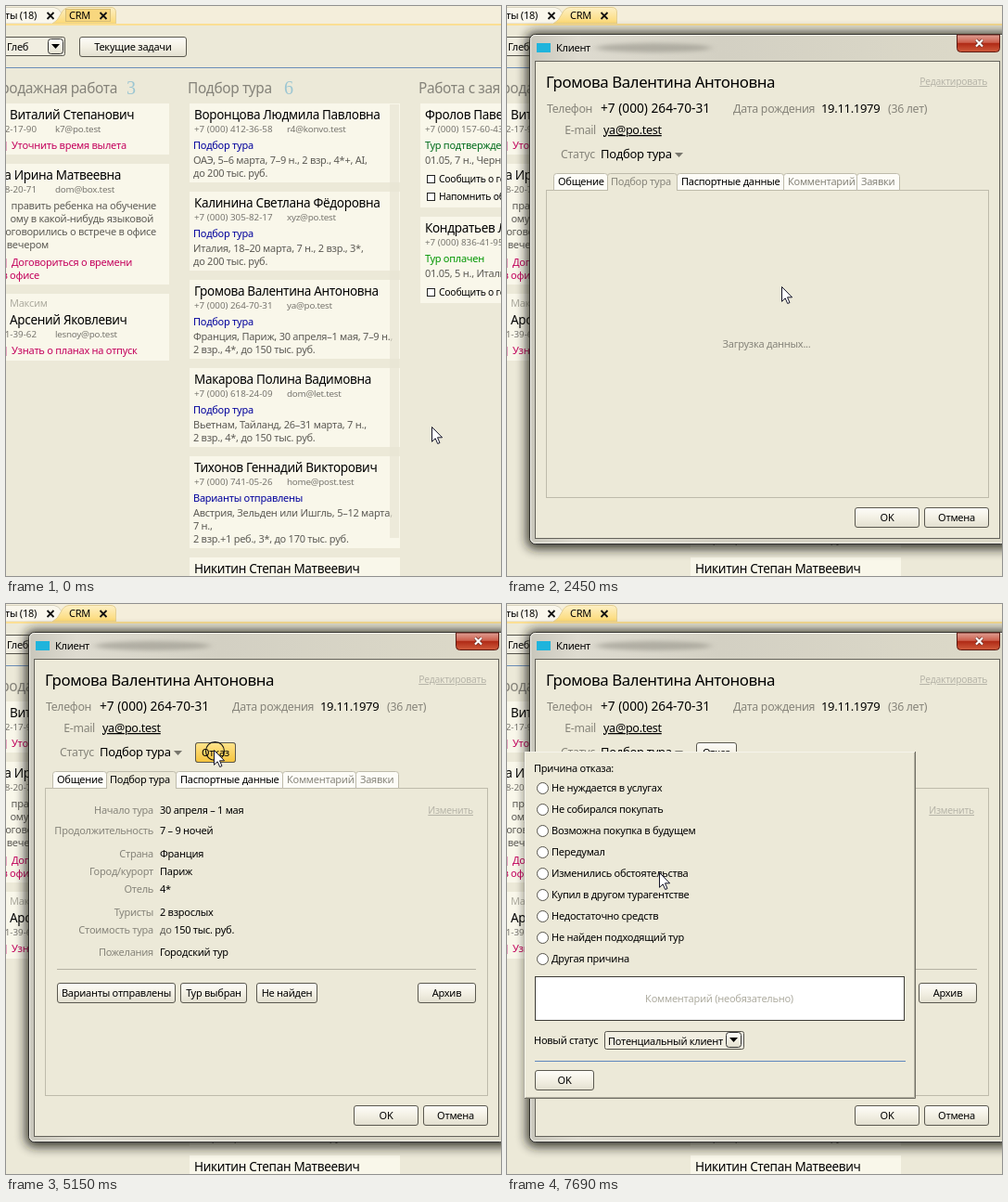
Animation, 534 px wide and 614 px high, one loop 8 s. Source, as an HTML page:

```html
<!DOCTYPE html>
<html lang="ru">
<head>
<meta charset="utf-8">
<title>CRM</title>
<style>
html, body { margin: 0; width: 100%; height: 100%; overflow: hidden; background: #ece9d8; }
svg { display: block; width: 534px; height: 614px; }
text { font: 11px "Noto Sans", "Open Sans", sans-serif; letter-spacing: -.024em; fill: #000; white-space: pre; }
.name { font-size: 13.5px; }
.head { font-size: 15.4px; fill: #85837a; }
.count { font: 20px "Liberation Serif", serif; fill: #9cc6d2; }
.small { font-size: 9.8px; fill: #78766f; }
.phone { letter-spacing: 0; }
.body { fill: #5d5b55; }
.blue { fill: #00009c; }
.pink { fill: #c4005c; }
.green { fill: #006c1c; }
.paid { fill: #009600; }
.task { font-size: 10.4px; }
.mute { fill: #86847a; }
.pale { fill: #aeaca0; }
.link { font-size: 10.3px; fill: #b6b4a8; text-decoration: underline; }
.title { font-size: 16.8px; }
.label { font-size: 12.3px; fill: #86847a; }
.value { font-size: 13px; }
.tel { font-size: 13.7px; letter-spacing: 0; }
.mail { font-size: 12.6px; text-decoration: underline; }

.timed, #cursor, #cursor g { animation: 8s step-end infinite; }
#win { animation-name: win; }
#focus { animation-name: focus; }
#load { animation-name: load; }
#data { animation-name: data; }
#hot { animation-name: hot; }
#popup { animation-name: popup; }
#caret { animation-name: caret; }
#click1 { animation-name: click1; }
#click2 { animation-name: click2; }
#cursor { animation-name: move; }
#cursor #arrow { animation-name: arrow; }
#cursor #hand { animation-name: hand; }

@keyframes win { 0% { visibility: hidden } 30.625%, 100% { visibility: visible } }
@keyframes focus { 0% { visibility: visible } 30.625%, 100% { visibility: hidden } }
@keyframes load { 0%, 32.375%, 100% { visibility: hidden } 30.625% { visibility: visible } }
@keyframes data { 0% { visibility: hidden } 32.375%, 100% { visibility: visible } }
@keyframes hot { 0%, 78.875%, 100% { visibility: hidden } 55.5% { visibility: visible } }
@keyframes popup { 0% { visibility: hidden } 66.125%, 100% { visibility: visible } }
@keyframes caret {
  0%, 80.625%, 94.25%, 100% { visibility: hidden }
  73.25%, 87.375% { visibility: visible }
}
@keyframes click1 { 0%, 30.625%, 100% { visibility: hidden } 28.625% { visibility: visible } }
@keyframes click2 { 0%, 66.125%, 100% { visibility: hidden } 64.375% { visibility: visible } }
@keyframes arrow { 0%, 30.625%, 100% { visibility: visible } 18.1% { visibility: hidden } }
@keyframes hand { 0%, 30.625%, 100% { visibility: hidden } 18.1% { visibility: visible } }
@keyframes move {
  0% { transform: translate(459px, 453px) }
  6.25% { transform: translate(459px, 453px); animation-timing-function: steps(8, start) }
  19.8% { transform: translate(319px, 312px) }
  19.875% { transform: translate(319px, 312px); animation-timing-function: steps(4, start) }
  26.5% { transform: translate(296px, 302px) }
  43% { transform: translate(286px, 288px) }
  44.75% { transform: translate(286px, 288px); animation-timing-function: steps(7, start) }
  57.25% { transform: translate(225px, 157px) }
  57.375% { transform: translate(224px, 157px) }
  78.875% { transform: translate(224px, 157px); animation-timing-function: steps(5, start) }
  87.3% { transform: translate(210px, 194px) }
  87.375% { transform: translate(210px, 194px); animation-timing-function: steps(3, start) }
  92.3% { transform: translate(172px, 262px) }
  92.5% { transform: translate(172px, 262px); animation-timing-function: steps(3, start) }
  97.9%, 100% { transform: translate(164px, 289px) }
}
</style>
</head>
<body>
<svg viewBox="0 0 534 614">
  <defs>
    <linearGradient id="face" x2="0" y2="1">
      <stop stop-color="#fefdf9"/><stop offset=".5" stop-color="#f3f0e4"/><stop offset="1" stop-color="#e2dfcf"/>
    </linearGradient>
    <linearGradient id="gold" x2="0" y2="1">
      <stop stop-color="#ffe48c"/><stop offset="1" stop-color="#f5c33c"/>
    </linearGradient>
    <linearGradient id="tab" x2="0" y2="1">
      <stop stop-color="#fdf0c6"/><stop offset="1" stop-color="#fcd974"/>
    </linearGradient>
    <linearGradient id="red" x2="0" y2="1">
      <stop stop-color="#e0a095"/><stop offset=".45" stop-color="#cc5f4c"/>
      <stop offset=".5" stop-color="#b02a16"/><stop offset="1" stop-color="#cf5b3c"/>
    </linearGradient>
    <linearGradient id="glass">
      <stop stop-color="#c9c7bc"/><stop offset=".1" stop-color="#dedbd0"/>
      <stop offset=".4" stop-color="#d3d0c3"/><stop offset="1" stop-color="#dddac9"/>
    </linearGradient>
    <filter id="blur" x="-10%" y="-10%" width="120%" height="120%"><feGaussianBlur stdDeviation="6"/></filter>
    <filter id="haze" x="-20%" y="-100%" width="140%" height="300%"><feGaussianBlur stdDeviation="4 2"/></filter>
  </defs>
  <g id="page"></g>
  <g id="win" class="timed"></g>
  <g id="popup" class="timed"></g>
  <g fill="none" stroke="#111" stroke-width="1.1">
    <circle id="click1" class="timed" cx="297" cy="303.5" r="10"/>
    <circle id="click2" class="timed" cx="225.5" cy="158.5" r="10"/>
  </g>
  <g id="cursor" fill="#fff" stroke="#15152a" stroke-linejoin="round">
    <g id="arrow"><path d="M.5.5V16.3L4.2 12.8 6.7 18.5 9 17.5 6.5 11.8H11.6Z"/></g>
    <g id="hand"><path d="M-1.5 13V2a1.8 1.8 0 0 1 3.6 0v5.5q1.7-1.3 3 .4q1.8-.9 2.9.7q2.5-.4 2.8 1.8v4.6l-2 4v2.7h-8.5v-2.7l-5-6.6q-.8-1.6.6-2q1.2-.2 2.6 2.6z"/></g>
  </g>
</svg>
<script>
const text = (x, y, s, cls = '', anchor = 'start') =>
  `<text x="${x}" y="${y}" class="${cls}" text-anchor="${anchor}">${s}</text>`;
const fill = (x, y, w, h, color) =>
  `<rect x="${x}" y="${y}" width="${w}" height="${h}" fill="${color}"/>`;
const box = (x, y, w, h, color, line, r = 0) =>
  `<rect x="${x + .5}" y="${y + .5}" width="${w - 1}" height="${h - 1}" rx="${r}" fill="${color}" stroke="${line}"/>`;
const path = (d, color, line = 'none', w = 1) =>
  `<path d="${d}" fill="${color}" stroke="${line}" stroke-width="${w}"/>`;
const button = (x, y, w, h, s, face = 'url(#face)') =>
  box(x, y, w, h, face, '#5a584f', 2.5) + text(x + w / 2, y + h / 2 + 4, s, '', 'middle');
const cross = (x, y, color = '#111', w = 1.8) =>
  path(`M${x - 3.5} ${y - 3.5}l7 7m0-7l-7 7`, 'none', color, w);
const drop = (x, y) =>
  box(x, y, 17, 17, 'url(#face)', '#333', 3) + path(`M${x + 4} ${y + 6}h9l-4.5 5z`, '#000');
const card = (x, y, w, h) => fill(x, y, w, h, '#f9f7ea');
const put = (id, parts) => document.getElementById(id).innerHTML = parts.join('');

function tourCard(y, h, name, phone, mail, status, lines) {
  return card(198, y, 227, h) + text(203, y + 17, name, 'name') +
    text(203, y + 31, phone, 'small phone') + text(303, y + 31, mail, 'small') +
    text(202, y + 49, status, 'blue') +
    lines.map((s, i) => text(202, y + 65 + 14 * i, s, 'body')).join('');
}

function orderCard(y, h, name, phone, status, cls, about, tasks) {
  return card(447, y, 90, h) + text(452, y + 17, name, 'name') +
    text(452, y + 31, phone, 'small phone') + text(452, y + 49, status, cls) +
    text(452, y + 65, about, 'body') +
    tasks.map((s, i) => box(454, y + 77 + 19 * i, 9, 9, '#fff', '#222') +
      text(467, y + 85 + 19 * i, s, 'task')).join('');
}

const choose = 'Подбор тура';
put('page', [
  fill(0, 0, 534, 614, '#ece9d8'),
  fill(0, 0, 534, 19, '#f4eedb'),
  path('M-1 1.5H52Q57 2 60 8T66 19H-1z', '#faf7ec', '#d8d3bf'),
  path('M50 19Q56 16 59 9T68 1.5H113Q118.5 1.5 118.5 7V19z', 'url(#tab)', '#e3cf93'),
  '<g id="focus" class="timed">', box(64, 3, 49, 14, '#f8d77e', '#d6bd78'), '</g>',
  fill(0, 19, 534, 2, '#fbdf94'),
  text(33, 14, 'Контакты (18)', '', 'end'), cross(48, 10.5),
  text(68, 14, 'CRM'), cross(105, 10.5),
  box(-5, 33, 69, 21, '#f1eee1', '#55534b', 2), text(1, 48, 'Глеб'), drop(45, 35),
  button(79, 33, 116, 22, 'Текущие задачи'),
  fill(0, 66, 534, 1, '#6a8db8'),

  text(120, 94, 'Предпродажная работа', 'head', 'end'), text(130, 95, '3', 'count'),
  text(196, 94, choose, 'head'), text(300, 95, '6', 'count'),
  text(445, 94, 'Работа с заявками', 'head'),

  card(0, 105, 176, 55),
  text(4, 122, 'Виталий Степанович', 'name'),
  text(33, 136, '42-17-90', 'small phone', 'end'), text(53, 136, 'k7@po.test', 'small'),
  fill(0, 146, 1, 10, '#e6a6c0'), text(6, 154, 'Уточнить время вылета', 'pink'),

  card(0, 170, 176, 130),
  text(124, 187, 'Голубева Ирина Матвеевна', 'name', 'end'),
  text(33, 201, '38-20-71', 'small phone', 'end'), text(53, 201, 'dom@box.test', 'small'),
  text(162, 219, 'править ребенка на обучение', 'body', 'end'),
  text(159, 233, 'ому в какой-нибудь языковой', 'body', 'end'),
  text(162, 247, 'Договорились о встрече в офисе', 'body', 'end'),
  text(46, 261, 'у вечером', 'body', 'end'),
  fill(0, 272, 1, 10, '#e6a6c0'), text(6, 280, 'Договориться о времени', 'pink'),
  text(36, 294, 'в офисе', 'pink', 'end'),

  card(0, 310, 176, 72),
  text(4, 324, 'Максим', 'pale'), text(4, 343, 'Арсений Яковлевич', 'name'),
  text(33, 357, '51-39-62', 'small phone', 'end'), text(53, 357, 'lesnoy@po.test', 'small'),
  fill(0, 367, 1, 10, '#e6a6c0'), text(6, 375, 'Узнать о планах на отпуск', 'pink'),

  tourCard(105, 85, 'Воронцова Людмила Павловна', '+7 (000) 412-36-58', 'r4@konvo.test', choose,
    ['ОАЭ, 5–6 марта, 7–9 н., 2 взр., 4*+, AI,', 'до 200 тыс. руб.']),
  tourCard(200, 85, 'Калинина Светлана Фёдоровна', '+7 (000) 305-82-17', 'xyz@po.test', choose,
    ['Италия, 18–20 марта, 7 н., 2 взр., 3*,', 'до 200 тыс. руб.']),
  tourCard(295, 85, 'Громова Валентина Антоновна', '+7 (000) 264-70-31', 'ya@po.test', choose,
    ['Франция, Париж, 30 апреля–1 мая, 7–9 н.,', '2 взр., 4*, до 150 тыс. руб.']),
  tourCard(390, 85, 'Макарова Полина Вадимовна', '+7 (000) 618-24-09', 'dom@let.test', choose,
    ['Вьетнам, Тайланд, 26–31 марта, 7 н.,', '2 взр., 4*, до 150 тыс. руб.']),
  tourCard(485, 99, 'Тихонов Геннадий Викторович', '+7 (000) 741-05-26', 'home@post.test', 'Варианты отправлены',
    ['Австрия, Зельден или Ишгль, 5–12 марта,', '7 н.,', '2 взр.+1 реб., 3*, до 170 тыс. руб.']),
  card(198, 594, 227, 20), text(203, 611, 'Никитин Степан Матвеевич', 'name'),
  fill(414, 106, 10, 467, 'rgba(232,229,212,.7)'),

  orderCard(105, 112, 'Фролов Павел', '+7 (000) 157-60-43', 'Тур подтвержден', 'green',
    '01.05, 7 н., Черногория', ['Сообщить о готовности', 'Напомнить об оплате']),
  orderCard(227, 93, 'Кондратьев Лев', '+7 (000) 836-41-95', 'Тур оплачен', 'paid',
    '01.05, 5 н., Италия', ['Сообщить о готовности'])
]);

const tabs = [
  [50, 59, 'Общение', ''], [183, 116, 'Паспортные данные', ''],
  [298, 80, 'Комментарий', 'mute'], [377, 47, 'Заявки', 'mute']
];
const facts = [
  [226, 'Начало тура', '30 апреля – 1 мая'], [248, 'Продолжительность', '7 – 9 ночей'],
  [273, 'Страна', 'Франция'], [292, 'Город/курорт', 'Париж'], [311, 'Отель', '4*'],
  [336, 'Туристы', '2 взрослых'],
  [355, 'Стоимость тура', '<tspan class="body">до</tspan> 150 тыс. руб.'],
  [379, 'Пожелания', 'Городский тур']
];
put('win', [
  '<rect x="21" y="28" width="530" height="557" rx="9" fill="#1c1b17" opacity=".85" filter="url(#blur)"/>',
  box(24, 30, 515, 550, 'url(#glass)', '#33322e', 6),
  '<ellipse cx="158" cy="45" rx="62" ry="5" fill="#8f8d83" opacity=".55" filter="url(#haze)"/>',
  box(25, 31, 513, 548, 'none', '#f4f3ec', 5),
  box(30, 59, 502, 515, '#ece9d8', '#64625a'),
  fill(32, 40, 15, 10, '#1fb4dc'),
  text(53, 49, 'Клиент'),
  path('M485.5 31V45.5Q485.5 49.5 489.5 49.5H527.5Q531.5 49.5 531.5 45.5V31z', 'url(#red)', '#5c1a12'),
  cross(509.5, 40, '#6b2a20', 3.6), cross(509.5, 40, '#fff', 2.2),

  text(42, 88, 'Громова Валентина Антоновна', 'title'),
  text(518, 85, 'Редактировать', 'link', 'end'),
  text(43, 115, 'Телефон', 'label'), text(101, 115, '+7 (000) 264-70-31', 'tel'),
  text(244, 115, 'Дата рождения', 'label'), text(339, 115, '19.11.1979', 'value'),
  text(411, 115, '(36 лет)', 'label'),
  text(96, 138, 'E-mail', 'label', 'end'), text(104, 138, 'ya@po.test', 'mail'),
  text(58, 164, 'Статус', 'label'), text(101, 164, choose, 'value'),
  path('M181 158h9l-4.5 5z', '#77756c'),

  box(42, 198, 478, 332, '#ece9d8', '#bebbab'),
  ...tabs.map(([x, w, s, cls]) =>
    path(`M${x + .5} 198.5V183.5q0-3 3-3H${x + w - 3.5}q3 0 3 3V198.5z`, '#fdfcf7', '#bebbab') +
    text(x + 5, 193, s, cls)),
  path('M108.5 199V183.5q0-3 3-3H180.5q3 0 3 3V199', '#ece9d8', '#bebbab'),
  fill(109, 198, 74, 2, '#ece9d8'),
  button(375, 540, 70, 22, 'OK'), button(450, 540, 70, 22, 'Отмена'),

  '<g id="load" class="timed">',
  text(112, 193, choose, 'mute'), text(280, 368, 'Загрузка данных...', 'mute', 'middle'),
  '</g><g id="data" class="timed">',
  text(112, 193, choose),
  button(204, 149, 44, 22, 'Отказ'),
  text(504, 226, 'Изменить', 'link', 'end'),
  ...facts.map(([y, key, val]) => text(159, y, key, 'mute', 'end') + text(166, y, val)),
  fill(55, 393, 452, 1, '#b5b2a3'),
  button(55, 408, 128, 22, 'Варианты отправлены'), button(188, 408, 72, 22, 'Тур выбран'),
  button(270, 408, 66, 22, 'Не найден'), button(444, 408, 63, 22, 'Архив'),
  '</g><g id="hot" class="timed">', button(204, 149, 44, 22, 'Отказ', 'url(#gold)'), '</g>'
]);

const reasons = ['Не нуждается в услугах', 'Не собирался покупать', 'Возможна покупка в будущем',
  'Передумал', 'Изменились обстоятельства', 'Купил в другом турагентстве', 'Недостаточно средств',
  'Не найден подходящий тур', 'Другая причина'];
put('popup', [
  fill(19, 159, 422, 374, '#ece9d8'),
  path('M19.5 532V159.5H440', 'none', '#f6f4ea'),
  path('M19 532.5H440.5V159', 'none', '#6f6d63'),
  path('M20 531.5H439.5V160', 'none', '#b5b2a3'),
  text(29, 181, 'Причина отказа:'),
  ...reasons.map((s, i) =>
    `<circle cx="38.5" cy="${198.5 + 23 * i}" r="6" fill="#fff" stroke="#55534b"/>` +
    text(48, 202 + 23 * i, s)),
  box(30, 401, 399, 48, '#fff', '#3c3b36'),
  text(229, 429, 'Комментарий (необязательно)', 'pale', 'middle'),
  '<g id="caret" class="timed">', fill(34, 404, 1, 14, '#000'), '</g>',
  text(29, 474, 'Новый статус'),
  box(105, 460, 151, 20, '#f1eee1', '#55534b', 2), text(109, 475, 'Потенциальный клиент'), drop(236, 461),
  fill(30, 492, 400, 1, '#5f87bd'),
  button(30, 502, 64, 22, 'OK')
]);
</script>
</body>
</html>
```
